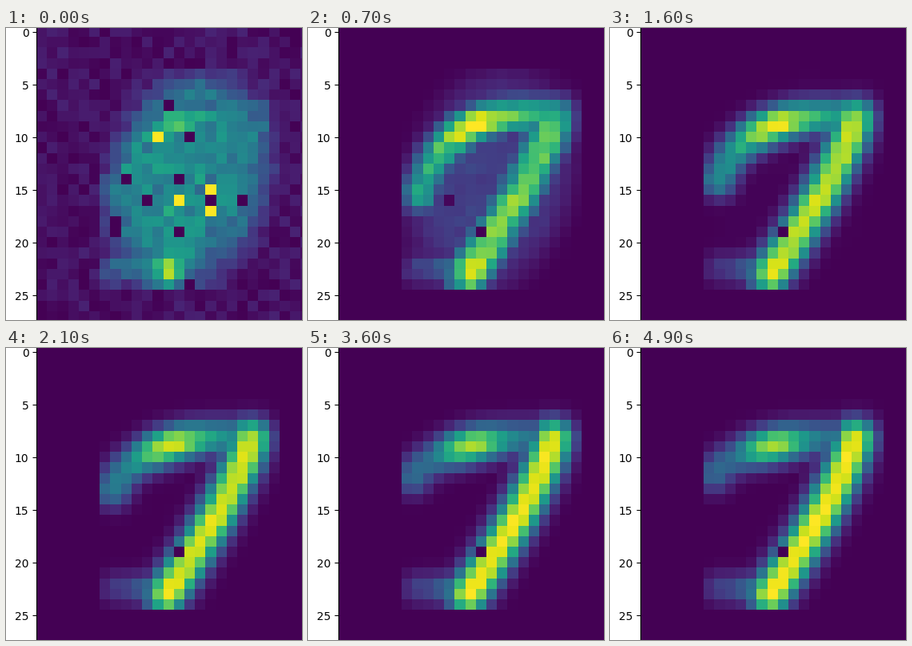
A matplotlib script for the animation above (5000 ms loop, 370 by 366 pixels).

```python
import numpy as np
import matplotlib.pyplot as plt
from matplotlib.animation import FuncAnimation

WIDTH, HEIGHT, DPI = 370, 366, 100
FRAMES, INTERVAL = 50, 100
SIZE, CELL = 28, 13.2
LEFT, TOP = 38.2, -1.4

plt.rcParams["font.family"] = "DejaVu Sans"
rows, cols = np.mgrid[0:SIZE, 0:SIZE].astype(float)
t = np.linspace(0, 1, 60)

# Oval that holds the first blur; it leans to the right.
rho = np.hypot((cols - 13.9 + 0.14 * (rows - 14)) / 7.6, (rows - 14.2) / 10.2)
window = (rows >= 4) & (rows <= 24) & (cols >= 6) & (cols <= 22)

rng = np.random.default_rng(7)
speckle = 0.1 * rng.random((SIZE, SIZE)) ** 1.3
grain = rng.normal(0, 0.12, (SIZE, SIZE))
holes = (rng.random((SIZE, SIZE)) < 0.035) & (rho < 1)
SPARKS = [(11, 10), (13, 16), (16, 15), (16, 17)]


def mix(a, b, amount):
    return (1 - amount) * np.asarray(a) + amount * np.asarray(b)


def bump(x, centre, width):
    return np.exp(-0.5 * ((x - centre) / width) ** 2)


def stroke(start, control, end, strength, width):
    """Soft quadratic curve whose strength varies along its length."""
    x, y = (mix(mix(a, b, t), mix(b, c, t), t)
            for a, b, c in zip(start, control, end))
    dist = np.hypot(cols[..., None] - x, rows[..., None] - y)
    return np.max(strength * np.exp(-0.5 * (dist / width) ** 2.2), axis=-1)


def field(ms):
    fog = 1 / (1 + (ms / 650) ** 4)
    settle = 1 - np.exp(-max(ms - 1100, 0) / 1050)
    gain = 0.55 + 0.32 * (1 - np.exp(-ms / 200)) + 0.13 * settle

    arm = stroke(mix((7.2, 15.5), (6.5, 11.5), settle),
                 mix((9.5, 7), (9, 8.5), settle),
                 (19.5, 8),
                 min(1, gain * 1.12) * (
                     mix(0.58, 0.33, settle)
                     + mix(0.44, 0.53, settle)
                     * bump(t, 0.58, mix(0.2, 0.13, settle))),
                 1.25)
    stem = stroke((19.8, 8.3), (17.8, 14.5), (11.8, 23),
                  gain * (1 - 0.35 * fog * (1 - t)),
                  1.35 + 0.25 * fog)
    foot = stroke((7, 22.4), (9.5, 22.5), (12, 22.6),
                  mix(0.12, 0.2, settle) + 0.5 * t ** 2 + 0.15 * fog, 1.1)
    blur = 0.43 * fog * np.exp(-rho ** 6)

    z = np.maximum.reduce([arm, stem, foot, blur]) * window
    z *= 1 + grain * mix(0.1, 1, np.exp(-ms / 1200))
    z += speckle * np.exp(-ms / 180)

    early = max(0, 1 - ms / 350)
    z[holes] *= 1 - early
    for x, y in SPARKS:
        z[y, x] = mix(z[y, x], 1, early)
    z[16, 10] *= np.clip((ms - 600) / 900, 0, 1)
    z[19, 13] = 0
    return np.clip(z, 0, 1)


fig = plt.figure(figsize=(WIDTH / DPI, HEIGHT / DPI), dpi=DPI, facecolor="white")
side = SIZE * CELL
ax = fig.add_axes([LEFT / WIDTH, (HEIGHT - TOP - side) / HEIGHT,
                   side / WIDTH, side / HEIGHT])
image = ax.imshow(field(0), cmap="viridis", vmin=0, vmax=1,
                  interpolation="nearest", aspect="auto")
ax.set_xticks([])
ax.set_yticks(range(0, SIZE, 5))


def update(frame):
    image.set_data(field(frame * INTERVAL))
    return (image,)


animation = FuncAnimation(fig, update, frames=FRAMES, interval=INTERVAL,
                          repeat=True, repeat_delay=0)
plt.show()
```
